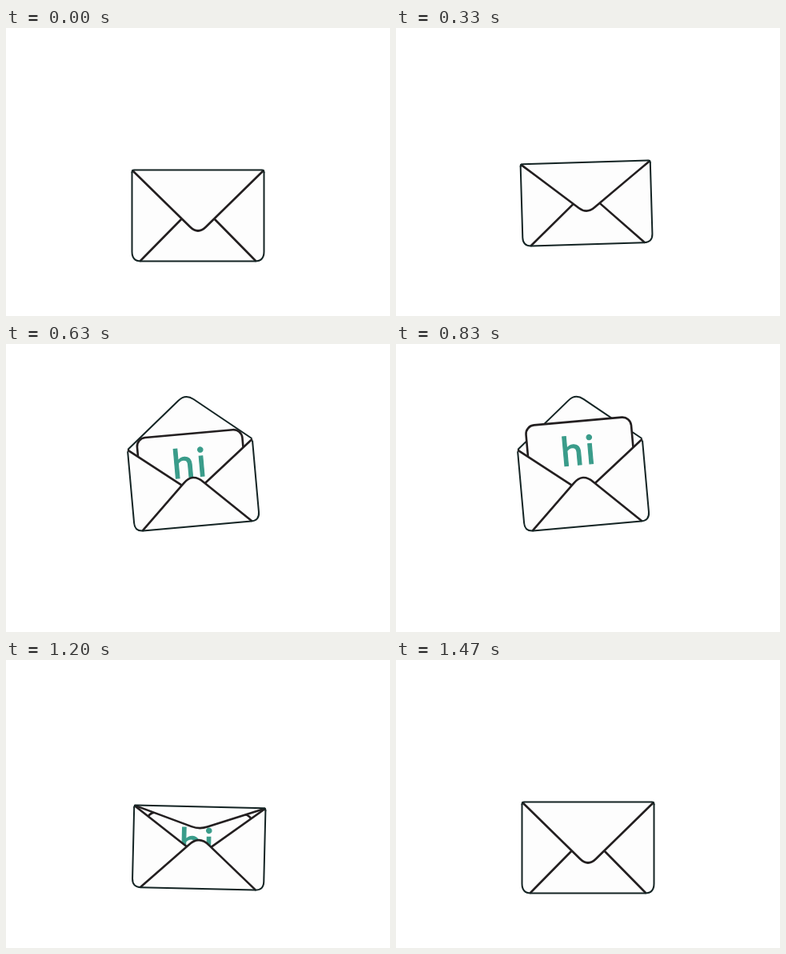
An HTML page for the animation above (1.83 s loop, 480 by 360 pixels).

```html
<!DOCTYPE html>
<html lang="en">
<head>
<meta charset="utf-8">
<title>Envelope</title>
<style>
  html, body { margin: 0; width: 100%; height: 100%; overflow: hidden; background: #fff; }
  svg { display: block; width: 100vw; height: 100vh; }
  path, rect {
    fill: #fdfdfd; stroke: #231f20; stroke-width: 2.6;
    stroke-linejoin: round; stroke-linecap: round;
    vector-effect: non-scaling-stroke;
  }
  .edge { stroke: #142424; stroke-width: 2; }
  .line { fill: none; }
  .fill { stroke: none; }
  text {
    font: 400 50px Lato, "Open Sans", sans-serif; letter-spacing: 3px;
    fill: #3a9c8a; stroke: #3a9c8a; stroke-width: 1.2;
  }
</style>
</head>
<body>
<svg viewBox="0 0 480 360">
  <!-- origin: middle of the envelope's bottom edge -->
  <g id="env">
    <g class="paper">
      <path class="fill" d="M-82.5 -114H82.5V-40H-82.5Z"/>
      <path id="back" class="edge"/>
    </g>
    <g id="letter">
      <rect x="-66" y="0" width="132" height="85" rx="11"/>
      <text x="-24.7" y="54.5">hi</text>
    </g>
    <g class="paper">
      <path class="fill" d="M-82 -113L-15 -58H15L82 -113V-11Q82 0 71 0H-71Q-82 0 -82 -11Z"/>
      <path class="line" d="M-81.5 -113L-15 -58M81.5 -113L15 -58"/>
      <path d="M-72 -.5L-13 -60.5Q0 -74.5 13 -60.5L72 -.5"/>
      <path class="edge line" d="M-82.5 -111V-12Q-82.5 0 -71.5 0H71.5Q82.5 0 82.5 -12V-111"/>
      <path id="front"/>
      <path id="fold" class="edge line" d="M-82.5 -111Q-82.5 -114 -80 -114H80Q82.5 -114 82.5 -111"/>
    </g>
  </g>
</svg>
<script>
const LOOP = 1830, FPS = 30, LAST = 44;

const $ = id => document.getElementById(id);
const env = $('env'), letter = $('letter'), back = $('back'), front = $('front'), fold = $('fold');
const papers = document.querySelectorAll('.paper');

// eased 0 to 1 between steps a and b
function ease(k, a, b) {
  const u = Math.min(1, Math.max(0, (k - a) / (b - a)));
  return u * u * (3 - 2 * u);
}

function pose(k) {
  const rise = ease(k, 5, 18);
  const lift = rise - ease(k, 31.5, 37);
  const press = ease(k, 0, 7) - ease(k, 36, 44);
  const open = ease(k, 8.4, 19.2) - ease(k, 28.7, 40.5);
  const slide = ease(k, 14, 23) - ease(k, 25, 36.5);
  return {
    x: 240 - lift,
    y: 291.5 - 64 * lift,
    tilt: -5.1 * rise + 6.8 * ease(k, 29.5, 37) - 1.7 * ease(k, 36, 44),
    w: 165 - 8.5 * lift,
    h: 114 - 11.5 * press,
    flap: 1 - 1.875 * open,
    top: 8.5 - 37.5 * slide
  };
}

// f = 1 hangs down shut, f < 0 stands open
function flapPath(f) {
  const y = v => (v * f - 114).toFixed(2);
  return `M-81.5 ${y(1)}L-10 ${y(71)}Q0 ${y(81)} 10 ${y(71)}L81.5 ${y(1)}`;
}

function draw(ms) {
  const k = Math.min(LAST, Math.floor((ms % LOOP + 4) * FPS / 1000));
  const { x, y, tilt, w, h, flap, top } = pose(k);
  env.setAttribute('transform', `translate(${x} ${y}) rotate(${tilt})`);
  papers.forEach(p => p.setAttribute('transform', `scale(${w / 165} ${h / 114})`));
  letter.setAttribute('transform', `translate(0 ${top - h})`);
  const up = flap < 0;
  back.setAttribute('d', up ? flapPath(flap) : '');
  front.setAttribute('d', up ? '' : flapPath(flap));
  fold.style.display = up ? 'none' : '';
}

const start = performance.now();
function tick() {
  draw(performance.now() - start);
  requestAnimationFrame(tick);
}
draw(0);
requestAnimationFrame(tick);
</script>
</body>
</html>
```
